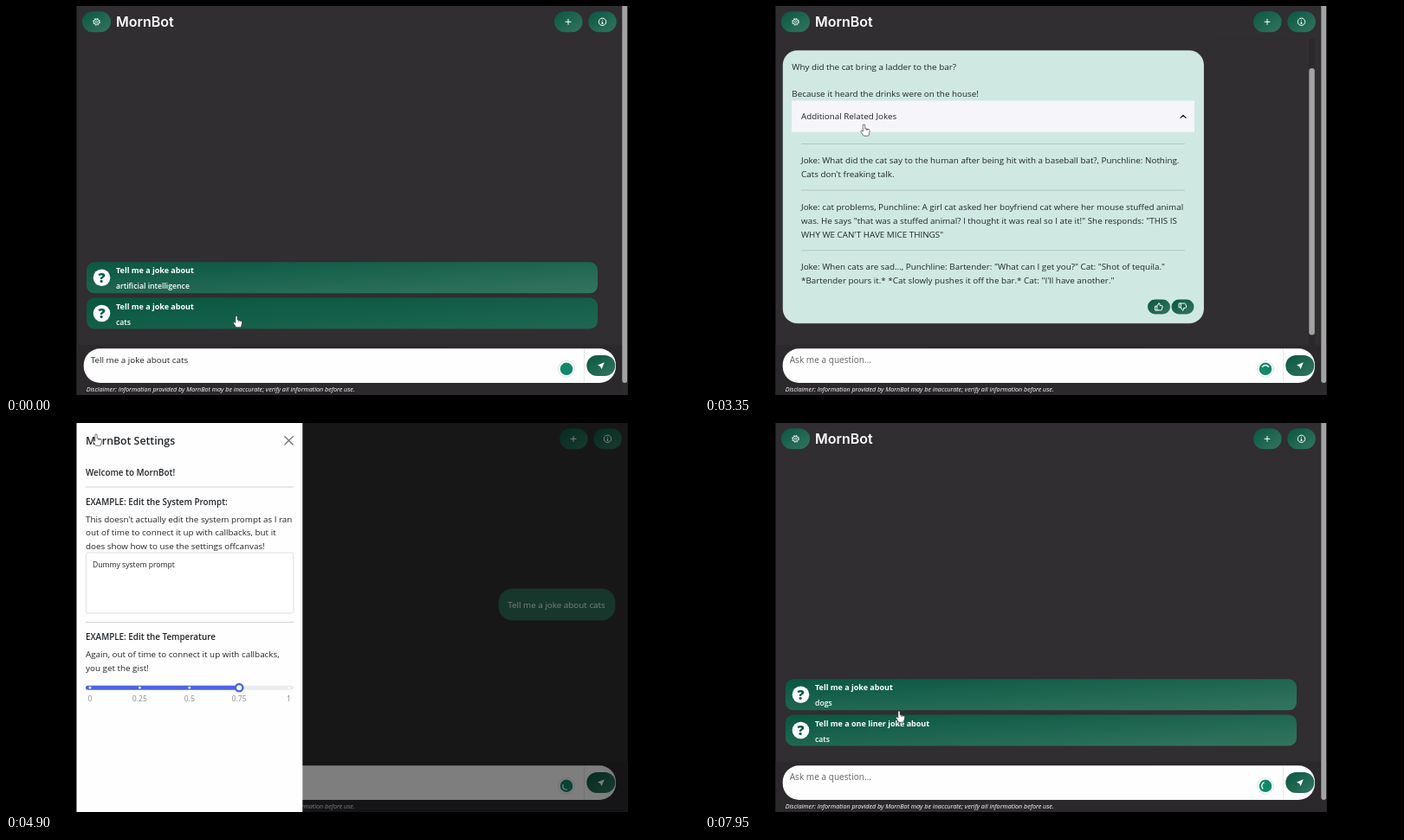
An HTML page for the animation above (8 s loop, 800 by 450 pixels).

```html
<!DOCTYPE html>
<html lang="en">
<head>
<meta charset="utf-8">
<title>MornBot</title>
<style>
  html, body { margin: 0; width: 100%; height: 100%; overflow: hidden; background: #000; }
  svg { display: block; }
  text { font-family: "Open Sans", "Noto Sans", sans-serif; font-size: 9.85px; fill: #212529; white-space: pre; }
  .brand { font-family: Inter, sans-serif; font-size: 16px; font-weight: 600; fill: #fff; }
  .light { fill: #fff; }
  .card { font-size: 9px; font-weight: 700; fill: #fff; }
  .topic { font-size: 8.7px; font-weight: 600; fill: #fff; }
  .note { font-size: 7.2px; font-style: italic; fill: #fff; }
  .hint { font-size: 10.1px; fill: #62666a; }
  .title { font-size: 12.3px; font-weight: 600; }
  .strong { font-weight: 600; }
  .small { font-size: 8.6px; }
  .mark { font-size: 8.6px; fill: #868e96; text-anchor: middle; }
  .query { font-size: 16px; font-weight: 800; fill: #0b5843; text-anchor: middle; }
  .icon { fill: none; stroke: #fff; stroke-width: 1; stroke-linecap: round; stroke-linejoin: round; }
  .edge { stroke: #000; stroke-opacity: .18; stroke-width: .7; }
</style>
</head>
<body>
<svg id="stage" width="800" height="450" viewBox="0 0 800 450"></svg>
<script>
const stage = document.getElementById('stage');

// Markup helpers; text is placed by the vertical centre of its line.
const text = (x, cy, s, cls = '') => `<text x="${x}" y="${cy + 3.4}" class="${cls}">${s}</text>`;
const lines = (x, cy, step, list, cls) => list.map((s, i) => text(x, cy + i * step, s, cls)).join('');
const rect = (x, y, w, h, fill, r = 0, extra = '') =>
  `<rect x="${x}" y="${y}" width="${w}" height="${h}" rx="${r}" fill="${fill}" ${extra}/>`;
const circle = (x, y, r, fill, extra = '') => `<circle cx="${x}" cy="${y}" r="${r}" fill="${fill}" ${extra}/>`;
const icon = (x, y, d, extra = '', flip = 1) =>
  `<path class="icon" transform="translate(${x} ${y}) scale(1 ${flip})" d="${d}" ${extra}/>`;
const group = (id, body) => `<g id="${id}">${body}</g>`;
const pill = (x, y, w, h) => rect(x, y, w, h, 'url(#green)', h / 2);
const rule = (x1, x2, y, color) => `<path d="M${x1} ${y}H${x2}" stroke="${color}" stroke-width=".8"/>`;
const gradient = (id, from, to) =>
  `<linearGradient id="${id}" x2="1" y2="1"><stop stop-color="${from}"/><stop offset="1" stop-color="${to}"/></linearGradient>`;

const THUMB = 'M-4-.8H-2.2V4H-4zM-2.2-.8L0-4.4Q1.5-4.2 1.1-1.4H3.3Q4.4-1.2 4.1 0L3.4 3.2Q3.1 4 2.2 4H-2.2';
const CHEVRON = 'M-3-1.5L0 1.5L3-1.5';

function card(id, y, title, topic, fill = 'green') {
  return group(id, rect(93, y, 590, 36, `url(#${fill})`, 9) +
    circle(110.5, y + 18, 9.8, '#fff') +
    `<text x="110.5" y="${y + 23.8}" class="query">?</text>` +
    text(127, y + 9.6, title, 'card') + text(127, y + 27.6, topic, 'topic'));
}

const firstCards = card('cardAi', 296.3, 'Tell me a joke about', 'artificial intelligence') +
  card('cardRest', 337.5, 'Tell me a joke about', 'cats') +
  card('cardHover', 337.5, 'Tell me a joke about', 'cats', 'hover');
const nextCards = card('cardDogs', 296.3, 'Tell me a joke about', 'dogs') +
  card('cardLiner', 337.5, 'Tell me a one liner joke about', 'cats');

const jokes =
  rule(111, 554, 13.7, '#a9bfb9') +
  lines(111, 33, 16, ['Joke: What did the cat say to the human after being hit with a baseball bat?, Punchline: Nothing.',
    "Cats don't freaking talk."]) +
  rule(111, 554, 67.3, '#a9bfb9') +
  lines(111, 87, 16, ['Joke: cat problems, Punchline: A girl cat asked her boyfriend cat where her mouse stuffed animal',
    'was. He says "that was a stuffed animal? I thought it was real so I ate it!" She responds: "THIS IS',
    'WHY WE CAN\'T HAVE MICE THINGS"']) +
  rule(111, 554, 137, '#a9bfb9') +
  lines(111, 156.3, 16, ['Joke: When cats are sad..., Punchline: Bartender: "What can I get you?" Cat: "Shot of tequila."',
    '*Bartender pours it.* *Cat slowly pushes it off the bar.* Cat: "I\'ll have another."']);

const question = rect(568.5, 0, 135.2, 36.9, '#2e6e5a', 16, 'class="edge"') +
  text(579.3, 19.3, 'Tell me a joke about cats', 'light');

const reply =
  '<rect id="bubble" class="edge" x="89.7" rx="17" fill="#cfe9e2"/>' +
  group('replyTop',
    text(100.3, 18.8, 'Why did the cat bring a ladder to the bar?') +
    text(100.3, 50.3, 'Because it heard the drinks were on the house!') +
    '<rect id="control" x="100" y="58" height="36.3" fill="#f6f5fa"/>' +
    text(111, 76.5, 'Additional Related Jokes') +
    group('chevron', `<path class="icon" style="stroke:#111;stroke-width:1.2" d="${CHEVRON}"/>`) +
    `<svg id="body" x="0" y="94.3" width="800" height="0" overflow="hidden">${jokes}</svg>`) +
  group('thumbs',
    pill(262, 339.5, 26, 17) + icon(275, 348, THUMB) +
    pill(289.5, 339.5, 26, 17) + icon(302.5, 348, THUMB, '', -1));

const settings =
  rect(81, 0, 261.3, 450, '#fefefe') +
  `<text x="92" y="25" class="title">MornBot Settings</text>` +
  icon(326.5, 20.3, 'M-4.7-4.7L4.7 4.7M4.7-4.7L-4.7 4.7', 'style="stroke:#6d6d6d;stroke-width:1.3"') +
  text(92, 57.8, 'Welcome to MornBot!', 'strong') + rule(92, 332, 74, '#c4c5c7') +
  text(92, 91.5, 'EXAMPLE: Edit the System Prompt:', 'strong') +
  lines(92, 111.3, 15.7, ["This doesn't actually edit the system prompt as I ran",
    'out of time to connect it up with callbacks, but it', 'does show how to use the settings offcanvas!']) +
  rect(92.4, 150, 239.4, 70, '#fff', 2.5, 'stroke="#d5d9dd" stroke-width=".8"') +
  text(100, 164, 'Dummy system prompt', 'small') + rule(92, 332, 230.6, '#c4c5c7') +
  text(92, 248, 'EXAMPLE: Edit the Temperature', 'strong') +
  lines(92, 267.8, 15.7, ['Again, out of time to connect it up with callbacks,', 'you get the gist!']) +
  rect(92, 303.7, 240, 5, '#e9ecef', 2.5) + rect(92, 303.7, 177, 5, '#4c64e8', 2.5) +
  [0, 0.25, 0.5, 0.75, 1].map((v) => circle(97 + v * 229.5, 306.2, 1.4, '#fff') +
    text(97 + v * 229.5, 319, v, 'mark')).join('') +
  circle(269.2, 306.2, 4.2, '#fff', 'stroke="#4c64e8" stroke-width="2.4"');

const tooltip =
  rect(581, 37.5, 130, 45, '#fefefe', 3, 'stroke="#1d1c1e" stroke-opacity=".35" stroke-width=".6"') +
  '<path d="M645 38L649.5 33.5L654 38z" fill="#fefefe"/>' +
  lines(591.5, 53.3, 14.3, ['Click here to start a new', 'conversation'], 'small');

const header =
  pill(88, 6.3, 33, 24) +
  circle(104.5, 18.3, 3.1, 'none', 'stroke="#fff" stroke-width=".9"') +
  circle(104.5, 18.3, 3.9, 'none', 'stroke="#fff" stroke-width="1" stroke-dasharray="1.53"') +
  circle(104.5, 18.3, 1.2, 'none', 'stroke="#fff" stroke-width=".8"') +
  '<text x="127" y="24.3" class="brand">MornBot</text>' +
  group('headerRight',
    pill(633, 6.3, 32.5, 24) + icon(649, 18.3, 'M-3 0H3M0-3V3') +
    pill(672.3, 6.3, 32.5, 24) + circle(688.5, 18.3, 4.2, 'none', 'stroke="#fff"') +
    icon(688.5, 18.3, 'M0-2V-1.9M-.5 0H0V2M-.7 2H.7'));

const footer =
  rect(81, 392, 637, 58, '#2b292c') +
  rect(89.7, 396.3, 614.3, 39.7, '#fefefe', 19) +
  '<path d="M667.5 397V435.5" stroke="#dfe1e4" stroke-width=".8"/>' +
  group('typed', text(97.7, 409.3, 'Tell me a joke about cats')) +
  group('hint', text(97.7, 409.3, 'Ask me a question...', 'hint')) +
  circle(647, 419.8, 9.4, '#fff', 'stroke="#d6dcda" stroke-width=".8"') + circle(647, 419.8, 7.3, '#11886a') +
  group('spinner', '<path class="icon" style="stroke-width:1.3" d="M-3.5-2.5A4.3 4.3 0 0 1 3.5-2.5"/>') +
  pill(670.3, 404, 33, 24) +
  '<path d="M690.8 412.3L683 415.4L686 416.9L687.6 420z" fill="#fff"/>' +
  text(92.7, 443, 'Disclaimer: Information provided by MornBot may be inaccurate; verify all information before use.', 'note');

stage.innerHTML =
  `<defs>${gradient('green', '#0a5742', '#33755f')}${gradient('hover', '#08563f', '#1f6752')}
   <clipPath id="app"><rect x="81.5" width="636" height="450"/></clipPath></defs>
   <g clip-path="url(#app)">` +
  rect(81, 0, 637, 450, '#302e30') +
  `<svg y="38" width="800" height="354" viewBox="0 38 800 354" overflow="hidden">` +
  group('firstCards', firstCards) + group('nextCards', nextCards) +
  group('question', question) + group('reply', reply) +
  group('innerScroll', rect(697, 38, 7, 354, '#2a282b') + rect(697.3, 72, 6.5, 308.5, '#a3a3a3', 3)) +
  '</svg>' + header + footer +
  group('pageScroll', rect(711, 0, 7, 450, '#2b2a2c') + rect(711.3, -4, 6, 440, '#a3a3a3', 3)) +
  group('tooltip', tooltip) +
  rect(81, 0, 637, 450, '#000', 0, 'id="backdrop"') +
  group('settings', settings) + '</g>' +
  group('cursor',
    '<path id="hand" transform="scale(.88)" fill="#fff" stroke="#222" stroke-width=".7" stroke-linejoin="round" d="M-1.3 1.2A1.3 1.3 0 0 1 1.3 1.2V5.2L6.2 6.4Q7.7 6.9 7.5 8.6L6.9 12L5.8 15H-.4L-3.9 9.8Q-4.6 8.2-3.2 7.9L-1.3 9.2zM3 8V5.7M5 8V6.2"/>' +
    '<path id="arrow" fill="#fff" stroke="#222" stroke-width=".7" d="M0 0V12L2.8 9.4L4.6 13.4L6.4 12.6L4.6 8.8H8.4z"/>');

const el = (id) => document.getElementById(id);
const set = (id, attrs) => { for (const k in attrs) el(id).setAttribute(k, attrs[k]); };
const show = (id, on) => set(id, { visibility: on ? 'inherit' : 'hidden' });
const move = (id, x, y, more = '') => set(id, { transform: `translate(${x} ${y}) ${more}` });
const span = (t, from, length) => Math.min(1, Math.max(0, (t - from) / length));

// CSS ease-in-out, cubic-bezier(.42, 0, .58, 1)
function ease(x) {
  let lo = 0, hi = 1, s = 0.5;
  for (let i = 0; i < 20; i++) {
    s = (lo + hi) / 2;
    const bx = 1.26 * (1 - s) ** 2 * s + 1.74 * (1 - s) * s * s + s ** 3;
    if (bx < x) lo = s; else hi = s;
  }
  return s * s * (3 - 2 * s);
}

const LOOP = 8000;
const SENT = 800, REPLY = 1500, EXPAND = 2800, COLLAPSE = 3500, OPEN = 4300, CLOSE = 5850, RESET = 6950;

// time, x, y of the pointer tip
const POINTER = [
  [0, 266, 358.5], [100, 266, 358.5], [650, 687, 412], [1700, 687, 412], [2300, 181.5, 322], [2950, 181.5, 322],
  [3250, 183.5, 137], [3600, 183.5, 137], [4150, 104, 13], [5100, 104, 13], [5600, 325, 15], [5950, 325, 15],
  [6350, 653, 22], [7100, 653, 22], [7800, 224, 333], [LOOP, 224, 333],
];
// time, degrees
const SPIN = [[SENT, 0], [2700, 585], [3350, 720], [4350, 1110], [4900, 1310], [6550, 1770], [LOOP, 2464]];

function segment(table, t) {
  const i = Math.max(1, table.findIndex((row) => row[0] > t));
  const [a, b] = [table[i - 1], table[i]];
  return { a, b, p: span(t, a[0], b[0] - a[0]) };
}

function render(t) {
  const sent = t >= SENT, chatting = sent && t < RESET, replied = t >= REPLY && chatting;
  const wide = t >= EXPAND && t < COLLAPSE + 200;
  const grow = ease(span(t, EXPAND, 200)) - ease(span(t, COLLAPSE, 200));
  const top = 242 - 190.5 * grow;

  show('firstCards', !sent);
  show('cardHover', t < 150 && !sent);
  show('cardRest', t >= 150 && !sent);
  show('nextCards', t >= RESET);
  show('typed', !sent);
  show('hint', sent);

  show('question', chatting);
  move('question', 0, replied ? top - 50.5 : 330.3);
  show('reply', replied);
  set('bubble', { y: top - 0.2, width: wide ? 486.3 : 236.8, height: 367.4 - top });
  move('replyTop', 0, top);
  set('control', { width: wide ? 465 : 216 });
  show('control', replied && t >= 2250 && t < COLLAPSE + 50);
  move('chevron', wide ? 552 : 303, 76.3, `rotate(${180 * grow})`);
  set('body', { height: 190.5 * grow });
  move('thumbs', wide ? 249 : 0, 0);
  show('innerScroll', grow > 0.6);

  const panel = ease(span(t, OPEN, 300)) - ease(span(t, CLOSE, 300));
  const modal = t >= OPEN && t < CLOSE + 300;
  move('settings', -260 * (1 - panel), 0);
  show('settings', modal);
  set('backdrop', { opacity: 0.5 * (span(t, OPEN, 150) - span(t, CLOSE, 150)) });
  show('pageScroll', !modal);
  move('headerRight', modal ? 6 : 0, 0);
  set('tooltip', { opacity: span(t, 6350, 150) - span(t, 7000, 150) });

  const spin = segment(SPIN, t);
  show('spinner', sent);
  move('spinner', 647, 419.8, `rotate(${spin.a[1] + (spin.b[1] - spin.a[1]) * spin.p})`);

  const { a, b, p } = segment(POINTER, t), q = ease(p);
  const travelling = a[1] !== b[1] && p > 0.1 && p < 0.9;
  move('cursor', a[1] + (b[1] - a[1]) * q, a[2] + (b[2] - a[2]) * q);
  show('hand', !travelling);
  show('arrow', travelling);
}

const start = performance.now();
function tick() {
  render((performance.now() - start) % LOOP);
  requestAnimationFrame(tick);
}
tick();
</script>
</body>
</html>
```
